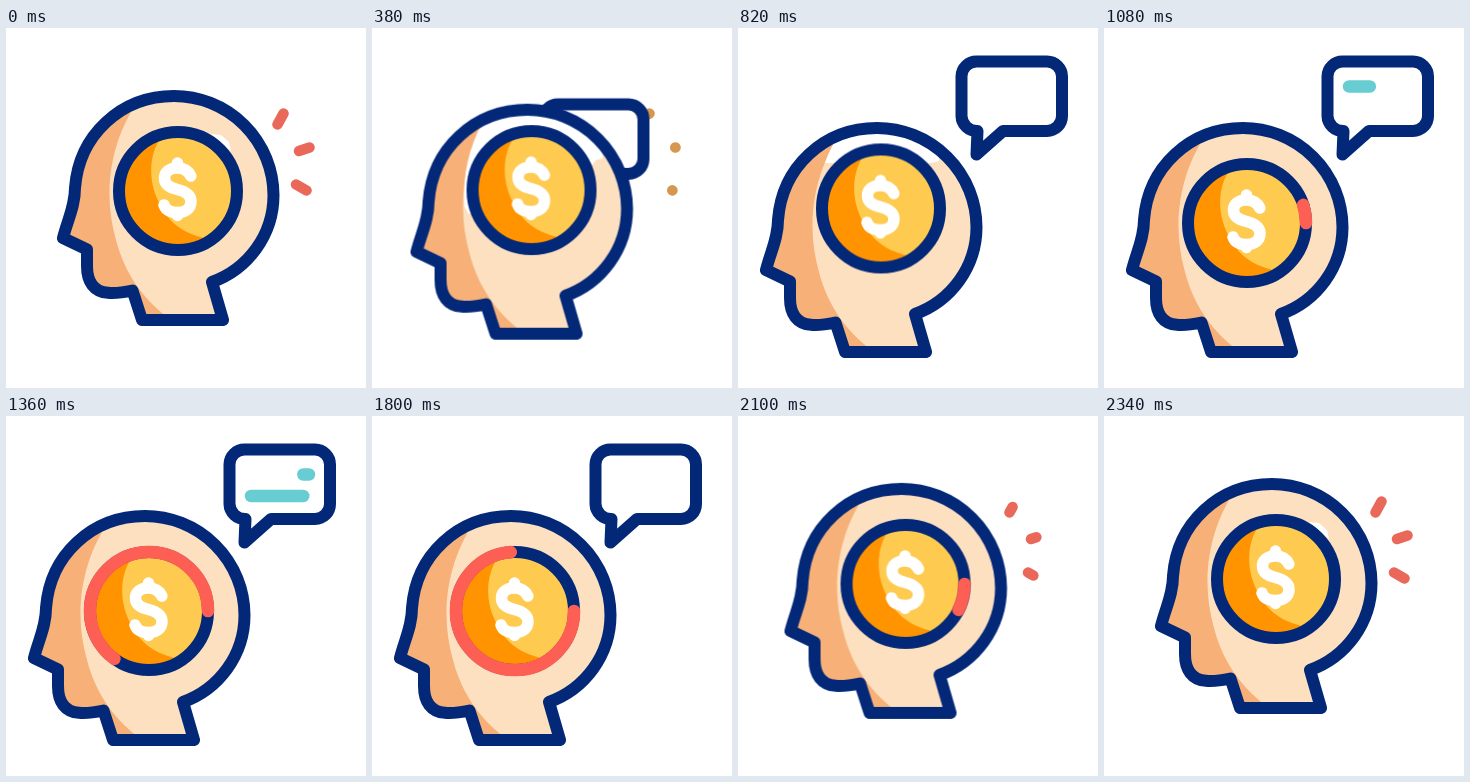
An HTML page that plays this animation: 360 by 360 pixels, repeating every 2.4 s.

```html
<!DOCTYPE html>
<html lang="en">
<head>
<meta charset="utf-8">
<title>Money idea</title>
<style>
  html, body { margin: 0; width: 100%; height: 100%; overflow: hidden; background: #fff; }
  svg { display: block; width: 100vw; height: 100vh; }

  .line { stroke: #042878; stroke-width: 12; stroke-linecap: round; stroke-linejoin: round; }
  .open { fill: none; }

  /* one 2400 ms clock for every part */
  .anim {
    animation-duration: 2400ms;
    animation-iteration-count: infinite;
    animation-timing-function: cubic-bezier(.3333, 0, .6667, 1);
  }
  .trim { fill: none; stroke-linecap: round; stroke-dasharray: 100 200; }
  .flash { fill: #fff; animation-timing-function: step-end; }

  .head { animation-name: head; }
  @keyframes head {
    0%, 8.333% { transform: translate(0, 0); }
    25%, 75% { transform: translate(-29px, 32px); }
    91.667%, 100% { transform: translate(0, 0); }
  }

  .bubble { animation-name: bubble; }
  @keyframes bubble {
    0%, 8.333% { transform: translate(-92px, 75px); }
    25%, 75% { transform: translate(0, 0); }
    91.667%, 100% { transform: translate(-103px, 88px); }
  }

  .coin { animation-name: coin; }
  @keyframes coin {
    0%, 8.333%, 25%, 41.667%, 100% { transform: translateY(0); }
    16.667%, 33.333% { transform: translateY(-15px); }
  }

  .ring { stroke: #fd5f55; stroke-width: 12.6; animation-name: ring; }
  @keyframes ring {
    0%, 41.66% { stroke-dashoffset: 100; opacity: 0; }
    41.667% { stroke-dashoffset: 100; opacity: 1; }
    66.667% { stroke-dashoffset: 0; }
    91.66% { stroke-dashoffset: -100; opacity: 1; }
    91.667%, 100% { stroke-dashoffset: -100; opacity: 0; }
  }

  .words { stroke: #67cdd2; stroke-width: 12.5; animation-name: words; }
  .second { animation-delay: -2200ms; }
  @keyframes words {
    0%, 41.66% { stroke-dashoffset: 100; opacity: 0; }
    41.667% { stroke-dashoffset: 100; opacity: 1; }
    50% { stroke-dashoffset: 0; }
    58.32% { stroke-dashoffset: -100; opacity: 1; }
    58.333%, 100% { stroke-dashoffset: -100; opacity: 0; }
  }

  .spark { stroke: #ea6859; stroke-width: 10.5; animation-name: spark; }
  @keyframes spark {
    0%, 8.333% { stroke-dashoffset: 0; stroke: #ea6859; opacity: 1; }
    16.66% { stroke-dashoffset: -100; stroke: #d6994f; opacity: 1; }
    16.667% { stroke-dashoffset: -100; opacity: 0; }
    16.67%, 83.32% { stroke-dashoffset: 100; stroke: #ea6859; opacity: 0; }
    83.333% { stroke-dashoffset: 100; stroke: #ea6859; opacity: 1; }
    91.667%, 100% { stroke-dashoffset: 0; stroke: #ea6859; opacity: 1; }
  }

  .glint { animation-name: glint; }
  @keyframes glint { 0% { opacity: 1; } 9.167% { opacity: 0; } 91.667%, 100% { opacity: 1; } }
  .wide { animation-name: wide; }
  @keyframes wide { 0% { opacity: 0; } 9.167% { opacity: 1; } 25%, 100% { opacity: 0; } }
  .crown { animation-name: crown; }
  @keyframes crown { 0% { opacity: 0; } 25% { opacity: 1; } 41.667%, 100% { opacity: 0; } }
</style>
</head>
<body>
<svg viewBox="0 0 360 360">
  <defs>
    <path id="skull" d="M57 210 C62 191 69 178 69 160 C73 107 115 68 168 68 A99.500 99.500 0 0 1 267.500 167 C267.500 207 242 241 206 254 L217 292 H136 L126.500 262.500 C117 264.500 108 265.500 102 264.800 C88 264 81 254 81 238 V221.500 Z"/>
    <clipPath id="inHead"><use href="#skull"/></clipPath>
    <clipPath id="inCoin"><circle cx="172" cy="163" r="59"/></clipPath>
  </defs>

  <g>
    <path class="anim trim spark" pathLength="100" d="M271.500 96.500 L277.500 85.500"/>
    <path class="anim trim spark" pathLength="100" d="M293 123 L303.500 119.500"/>
    <path class="anim trim spark" pathLength="100" d="M290 156.500 L300.500 162.500"/>
  </g>

  <g class="anim bubble">
    <path class="line" fill="#fff" d="M239 33.500 H309 A15 15 0 0 1 324 48.500 V88 A15 15 0 0 1 309 103 H265 L238.500 126.500 L239.500 103 A15.500 15.500 0 0 1 223.500 88 V48.500 A15 15 0 0 1 239 33.500 Z"/>
    <path class="anim trim words" pathLength="100" d="M245 58.500 H303"/>
    <path class="anim trim words second" pathLength="100" d="M245 80 H303"/>
  </g>

  <g class="anim head">
    <g clip-path="url(#inHead)">
      <use href="#skull" fill="#fce0c0"/>
      <path fill="#f6b078" d="M40 60 H142 C106 102 95 160 110 212 C119 247 139 274 168 294 H40 Z"/>
      <path class="anim flash glint" d="M205 106 L215 107 L223 114 L225 123 L217 116 Z"/>
      <path class="anim flash wide" d="M136 60 C112 92 102 130 105 165 L109 172 L172 163 L232 124 L237 118 L243 117 V60 Z"/>
      <path class="anim flash crown" d="M140 60 Q122 84 116 103 H222 L230 101 V60 Z"/>
    </g>
    <use href="#skull" class="line open"/>

    <g class="anim coin">
      <g clip-path="url(#inCoin)">
        <circle cx="172" cy="163" r="59" fill="#ff9300"/>
        <path fill="#fecb50" d="M161 102 C141 122 141 155 155 178 C165 198 182 208 208 212 L240 212 V102 Z"/>
      </g>
      <path fill="none" stroke="#fff" stroke-width="11.500" stroke-linecap="round" stroke-linejoin="round"
        d="M184.800 148 C182 142 177 140 171.500 140 C163 140 158.500 144.500 158.500 150 C158.500 157 164 159.500 171.500 161.500 C179 163.500 185 166.500 185 173.500 C185 180.500 179 184.500 171.500 184.500 C164 184.500 159.500 181.500 158 177 M171.500 135 V140 M171.500 184.500 V187.500"/>
      <circle class="line open" cx="172" cy="163" r="59"/>
      <path class="anim trim ring" pathLength="100" d="M231 163 A59 59 0 0 0 113 163 A59 59 0 0 0 231 163"/>
    </g>
  </g>
</svg>
</body>
</html>
```
